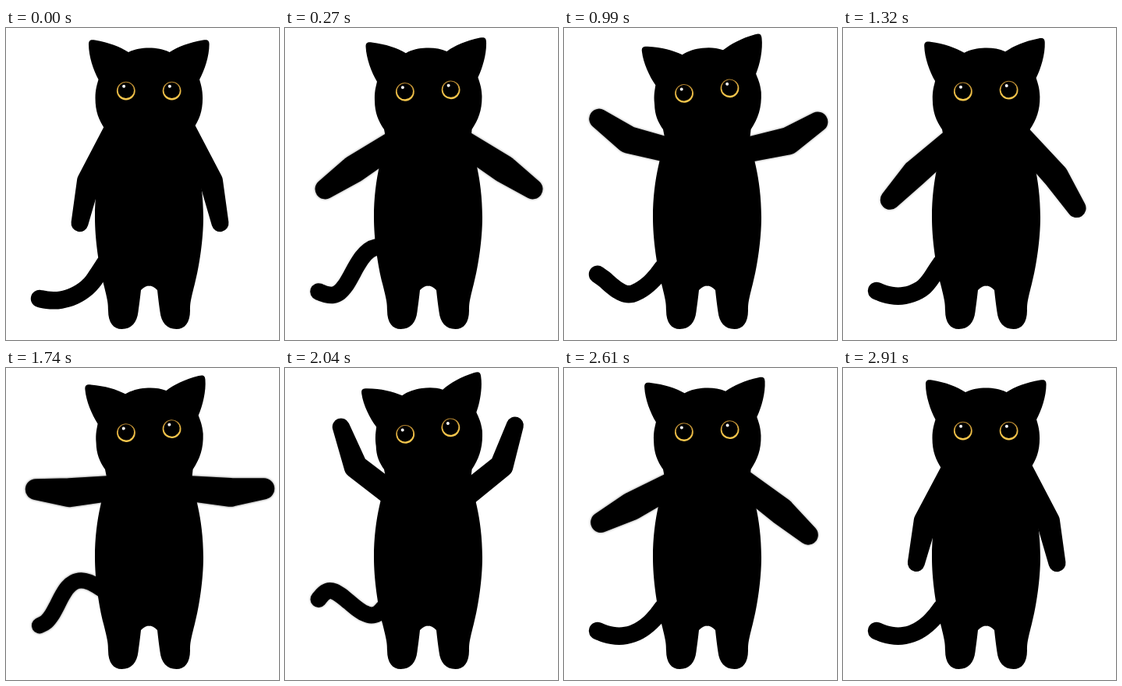
An HTML page that plays this animation: 350x400 px, repeating every 3.03 s.

```html
<!DOCTYPE html>
<html lang="en">
<head>
<meta charset="utf-8">
<title>Dancing cat</title>
<style>
  html, body { margin: 0; width: 100%; height: 100%; overflow: hidden; background: #fff; }
  svg { display: block; width: 350px; height: 400px; }
  #tail { fill: none; stroke: #000; stroke-linecap: round; }
</style>
</head>
<body>
<svg viewBox="0 0 350 400">
  <defs>
    <linearGradient id="gold" x1="0" y1="0" x2="0" y2="1">
      <stop offset="0" stop-color="#a87a2c"/>
      <stop offset=".5" stop-color="#eab944"/>
      <stop offset="1" stop-color="#f5c84e"/>
    </linearGradient>
    <g id="eye">
      <circle r="11.9" fill="url(#gold)"/>
      <circle cy="-0.7" r="10.2"/>
      <circle cx="-2.7" cy="-5.8" r="2" fill="#fff"/>
    </g>
    <path id="half" d="M184 125H134C126 160 114 190 114 243C114 270 119 305 125 328
      C130 348 131 352 131 362C131 378 138 386 148.5 386C161 386 168 377 169.5 364
      C171 353 172 346 173 336C177 332 180 330.5 184 330.5Z"/>
  </defs>
  <path id="tail"/>
  <path id="left"/>
  <g transform="translate(369 0) scale(-1 1)"><path id="right"/></g>
  <use href="#half"/>
  <use href="#half" transform="translate(367 0) scale(-1 1)"/>
  <path id="head"/>
  <g id="eyes">
    <use href="#eye" x="153.8" y="80.6"/>
    <use href="#eye" x="212.6" y="80.6"/>
  </g>
</svg>
<script>
const LOOP = 3030, STEP = 30, LAST = 2910;
const PIVOT = [183.3, 80];
const el = id => document.getElementById(id);
const rad = deg => deg * Math.PI / 180;
const clamp = v => Math.max(0, Math.min(1, v));

// Left half of the head as Bezier points, from the neck up to the crown
const CHEEK = [[127,130], [119,118], [114.5,107], [114.5,90], [114.5,78], [117,72], [118.5,66],
  [112,54], [106,36], [106,21], [106,16], [108,14.5], [114,15.5],
  [132,18.5], [146,24], [157,31], [165,27], [174,25.5], [183.3,25.5]];
const HEAD = CHEEK.concat(CHEEK.slice(0, -1).reverse().map(([x, y]) => [2 * PIVOT[0] - x, y]));

// Turning points of each arm: time and lift, 0 = hanging, 1 = raised
const LEFT  = [[0, 0], [750, 1], [1410, .17], [2100, 1], [2940, 0]];
const RIGHT = [[0, 0], [750, 1], [1410, .1], [2060, 1], [2880, 0]];
const SWISHES = [0, 1300];

// Half-cosine easing between turning points
function sway(keys, t) {
  const i = keys.findIndex(k => k[0] > t);
  if (i < 0) return keys[keys.length - 1][1];
  const [t0, a] = keys[i - 1], [t1, b] = keys[i];
  return a + (b - a) * (1 - Math.cos(Math.PI * (t - t0) / (t1 - t0))) / 2;
}

const polar = ([x, y], r, a) => [x + r * Math.cos(a), y + r * Math.sin(a)];

// Tapered capsule around two circles
function taper(a, ra, b, rb) {
  const dx = b[0] - a[0], dy = b[1] - a[1];
  const dir = Math.atan2(dy, dx), open = Math.acos((ra - rb) / Math.hypot(dx, dy));
  const wide = open > Math.PI / 2 ? 1 : 0;
  return `M${polar(a, ra, dir + open)}A${ra} ${ra} 0 ${1 - wide} 1 ${polar(a, ra, dir - open)}`
    + `L${polar(b, rb, dir - open)}A${rb} ${rb} 0 ${wide} 1 ${polar(b, rb, dir + open)}Z`;
}

// Smooth open curve through the points
function curve(p) {
  const at = i => p[Math.max(0, Math.min(p.length - 1, i))];
  let d = "M" + p[0];
  for (let i = 0; i < p.length - 1; i++) {
    const [a, b, c, e] = [at(i - 1), at(i), at(i + 1), at(i + 2)];
    const out = b.map((v, k) => v + (c[k] - a[k]) / 6);
    const into = c.map((v, k) => v - (e[k] - b[k]) / 6);
    d += `C${out} ${into} ${c}`;
  }
  return d;
}

function soften(node, amount) {
  node.style.filter = amount > .03
    ? `drop-shadow(0 0 1.5px rgba(0,0,0,${(.6 * amount).toFixed(3)}))` : "none";
}

// Two bones; the forearm turns further and swells a little on the way
function drawArm(id, lift) {
  const swell = Math.sin(Math.PI * lift);
  const upper = rad(118 + 101 * lift), fore = rad(102 + 150 * lift);
  const shoulder = [128, 155];
  const elbow = polar(shoulder, 47, upper);
  const hand = polar(elbow, 43 + 12 * (2 * lift - 1) ** 2, fore);
  const bend = 15 + 3.5 * swell;
  el(id).setAttribute("d", taper(polar(shoulder, -25, upper), 15.5, elbow, bend)
    + taper(elbow, bend, hand, 11 + 2.5 * swell));
  soften(el(id), swell);
}

// A hump that travels from the root (u = 0) to the tip (u = 1)
function hump(u, t) {
  return SWISHES.reduce((sum, start) => {
    const phase = clamp((t - start + 130 - 450 * u) / 900);
    return sum + Math.sin(Math.PI * phase) ** 2;
  }, 0);
}

function drawTail(t) {
  const points = [];
  for (let u = 0; u < 1.01; u += .1) {
    const rise = (27 + 150 * u - 136 * u * u) * hump(u, t);
    const droop = 10 * u * u * clamp(1 - t / 300);
    points.push([126 - 70 * u - 13 * u * u - .6 * u * (1 - u) * rise,
      308 + 102 * u - 73 * u * u - rise + droop]);
  }
  const raised = clamp(hump(.5, t));
  el("tail").setAttribute("d", curve(points));
  el("tail").setAttribute("stroke-width", 22.5 - 2.5 * raised);
  soften(el("tail"), raised);
}

// The neck stays put while the rest of the head tilts
function drawHead(tilt) {
  const p = HEAD.map(([px, py]) => {
    const a = rad(tilt) * clamp((130 - py) / 40);
    const x = px - PIVOT[0], y = py - PIVOT[1];
    return [PIVOT[0] + x * Math.cos(a) + y * Math.sin(a),
      PIVOT[1] + y * Math.cos(a) - x * Math.sin(a)];
  });
  el("head").setAttribute("d", `M${p[0]}C${p.slice(1).join(" ")}L238 145L130 145Z`);
  el("eyes").setAttribute("transform", `rotate(${-tilt} ${PIVOT})`);
}

function draw(t) {
  const lift = sway(LEFT, t);
  drawArm("left", lift);
  drawArm("right", sway(RIGHT, t));
  drawTail(t);
  drawHead(8.5 * lift);
}

const start = performance.now();
function tick() {
  const t = (performance.now() - start) % LOOP;
  draw(Math.min(LAST, Math.floor(t / STEP) * STEP));
  requestAnimationFrame(tick);
}
tick();
</script>
</body>
</html>
```
